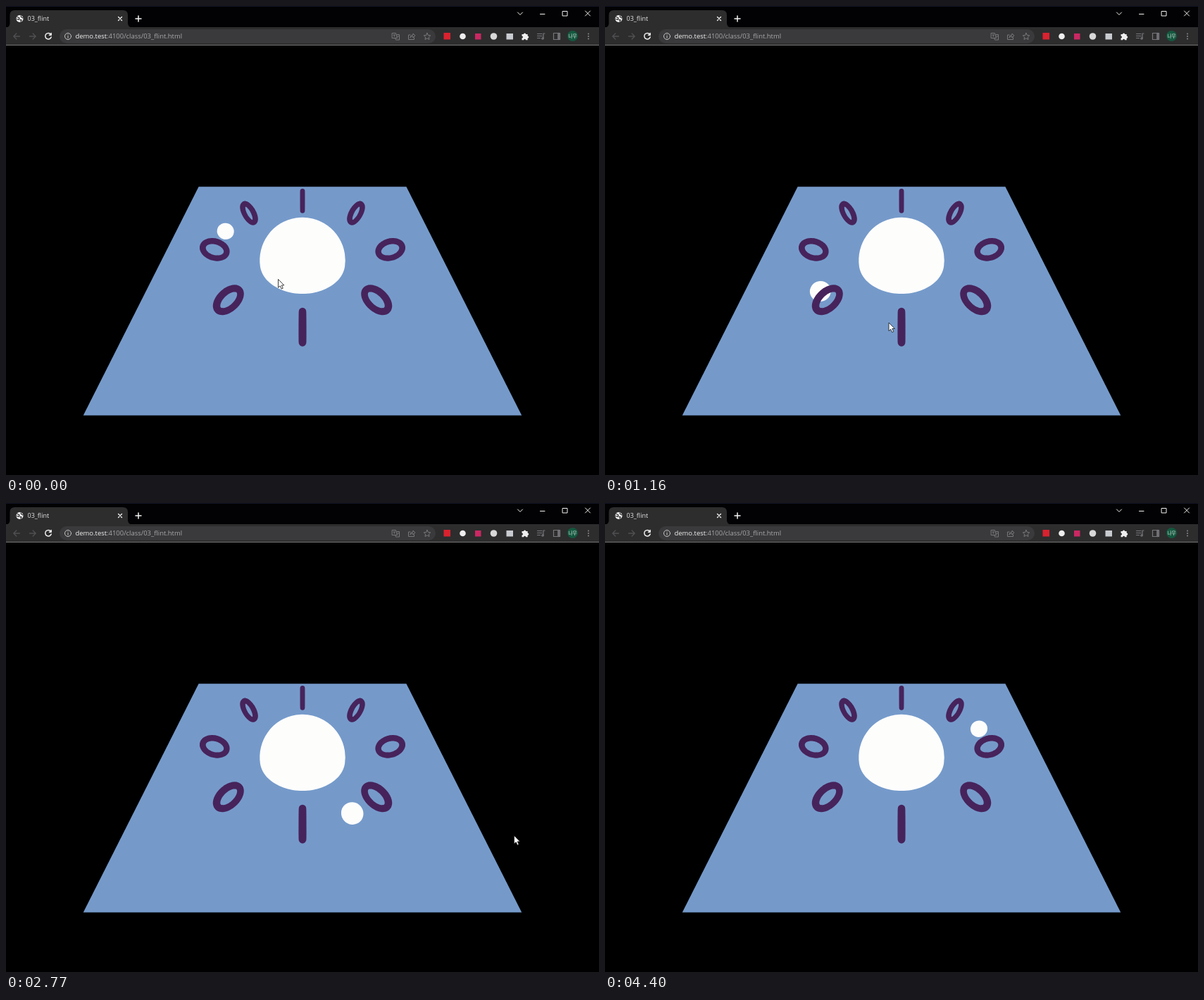
These frames come from a looping animation (842x665 px, 4.43 s). An HTML page with a canvas:

```html
<!DOCTYPE html>
<html lang="ko">
<head>
<meta charset="utf-8">
<title>03_flint</title>
<style>
  html, body { margin: 0; width: 100%; height: 100%; overflow: hidden; background: #000; }
  #stage { position: relative; width: 842px; height: 665px; overflow: hidden; background: #000; }
  canvas, svg { position: absolute; left: 0; top: 0; display: block; }
  text { font-family: "Open Sans", "Noto Sans", sans-serif; }
  .line { fill: none; stroke-linecap: round; stroke-linejoin: round; }
</style>
</head>
<body>
<div id="stage">
  <canvas id="scene" width="842" height="665"></canvas>
  <svg width="842" height="665" viewBox="0 0 842 665">
    <!-- tab strip -->
    <rect width="842" height="30" fill="#020204"/>
    <rect width="842" height="1" fill="#111426"/>
    <path d="M0 30.5Q5 30 5.500 25V13Q5.500 6 12.500 6H166Q173 6 173 13V25Q173.500 30 179 30.500Z" fill="#2d2d2e"/>
    <g class="line" stroke="#2d2d2e" stroke-width="1.300">
      <circle cx="19.500" cy="18" r="5" fill="#f1f1f1" stroke="none"/>
      <path d="M16 15.500l3 1.500l-1 2.500l-2.500-1M21 14l1 2l2 1M20 19.500l2 .5l-1 2"/>
    </g>
    <text x="30.500" y="21.200" font-size="9" fill="#e4e4e4">03_flint</text>
    <g class="line" stroke="#f4f4f4" stroke-width="1.300">
      <path d="M159.500 15.500l5 5m0-5l-5 5"/>
      <path d="M184 18h8m-4-4v8" stroke-width="1.500"/>
      <path d="M726.500 9l3.500 3.500l3.500-3.500" stroke-width="1"/>
      <path d="M758.500 11.500h6.500M822.500 7l7 7m0-7l-7 7" stroke-width="1"/>
      <rect x="790.500" y="7.500" width="6.500" height="6.500" stroke-width="1"/>
    </g>

    <!-- toolbar -->
    <rect y="30" width="842" height="25" fill="#2d2d2e"/>
    <rect y="55" width="842" height="1" fill="#777"/>
    <rect x="76" y="33" width="534" height="20" rx="10" fill="#3a3a3c"/>
    <g class="line" stroke="#505052" stroke-width="1.300">
      <path d="M19.500 43h-8.500m3.800-4l-4 4l4 4"/>
      <path d="M33.500 43h8.500m-3.800-4l4 4l-4 4"/>
    </g>
    <path class="line" d="M63.600 40.200a4.300 4.300 0 1 0 .6 3.800M64.200 38.500v2.700h-2.700" stroke="#eee" stroke-width="1.500"/>
    <g class="line" stroke="#c4c4c4" stroke-width="1">
      <circle cx="88" cy="43" r="4.500"/>
      <path d="M88 42.500v2.800M88 40.600v.2"/>
    </g>
    <text x="98.500" y="46.300" font-size="9.450" fill="#a8a8aa"><tspan fill="#f2f2f2">demo.test</tspan>:4100/class/03_flint.html</text>
    <g class="line" stroke="#77777a" stroke-width="1">
      <path d="M548.500 38.500h5l2 7h-7zM555 40.500h3.500v7.500h-5l-1-2.500M550 41h2.500m-1.200 0v2.500M555.500 43h2"/>
      <path d="M574 41h-2.500v6.500h8V45M574 44.500q.5-3.500 4-3.500v-2l3 3l-3 3v-2q-2.500 0-4 1.500z"/>
      <path d="M598 38.300l1.400 3.100l3.400.4l-2.500 2.300l.7 3.400l-3-1.700l-3 1.700l.7-3.400l-2.500-2.300l3.400-.4z"/>
    </g>

    <!-- extensions -->
    <rect x="621.500" y="38" width="9.500" height="9.500" fill="#d9222f"/>
    <circle cx="648.500" cy="43" r="4.300" fill="#eee"/>
    <rect x="666" y="39" width="8.500" height="8.500" fill="#c92862"/>
    <circle cx="692.500" cy="43" r="4.800" fill="#d8d8d8"/>
    <rect x="710.500" y="39" width="9.500" height="8.500" fill="#c8cbd0"/>
    <path d="M732.500 40h2.500a1.600 1.600 0 0 1 3.200 0h2.500v2.500a1.600 1.600 0 0 1 0 3.200v2.500h-2.600a1.500 1.500 0 0 0-3 0h-2.600v-2.600a1.500 1.500 0 0 0 0-3z" fill="#f0f0f0"/>
    <g class="line" stroke="#77777c" stroke-width="1.200">
      <path d="M754.500 39.500h6.500M754.500 42.500h6.500M754.500 45.500h4M763 46v-7h2"/>
      <circle cx="762" cy="46" r="1.200"/>
      <rect x="777.500" y="38.500" width="9" height="9"/>
      <path d="M784.500 39v8" stroke-width="2.500"/>
    </g>
    <circle cx="804.500" cy="42.500" r="7.500" fill="#14583f"/>
    <text x="804.500" y="45" font-size="6.500" fill="#eee" text-anchor="middle" style="font-family:'Noto Sans CJK KR','Noto Sans CJK',sans-serif">나무</text>
    <g fill="#88888b">
      <circle cx="827" cy="39.500" r="1"/><circle cx="827" cy="43" r="1"/><circle cx="827" cy="46.500" r="1"/>
    </g>

    <path id="cursor" d="M0 0V11.800L2.700 9.300L4.600 13.600L6.700 12.700L4.800 8.500H8.300Z" fill="#fff" stroke="#111" stroke-width=".8"/>
  </svg>
</div>
<script>
const LOOP = 4430;
const CX = 421, CY = 360.5;
const FOCAL = 304 / Math.tan(37.5 * Math.PI / 180);
const H = Math.SQRT1_2, DIST = 7 * Math.SQRT2;
const RAD = Math.PI / 180;

// time, degrees around the dome
const ORBIT = [[0, -109.6], [760, -73.2], [1560, -33.3], [2070, -8.1], [2770, 27], [3230, 50.8], [4430, 110.3]];
// time, x, y of the pointer tip
const POINTER = [[0, 386.5, 387.5], [150, 388, 388], [620, 780, 425], [760, 787, 427], [840, 784, 428],
  [1050, 403, 449], [1630, 403, 449], [2000, 698, 472], [2070, 704.5, 473], [2400, 714, 473],
  [2670, 721, 472], [2780, 721.5, 471.5], [2950, 773, 462]];
const POINTER_END = 2980;

const ctx = document.getElementById('scene').getContext('2d');
const cursor = document.getElementById('cursor');

function sample(keys, t, col) {
  let i = 1;
  while (i < keys.length - 1 && keys[i][0] < t) i++;
  const a = keys[i - 1], b = keys[i];
  const k = Math.min(1, (t - a[0]) / (b[0] - a[0]));
  return a[col] + (b[col] - a[col]) * k;
}

// near: towards the viewer along the ground, side: screen right
const toView = (near, height, side) => [side, (height - near) * H, DIST - (near + height) * H];

function toScreen(near, height, side) {
  const [x, y, z] = toView(near, height, side);
  return [CX + x * FOCAL / z, CY - y * FOCAL / z];
}

// A sphere in perspective is an ellipse stretched away from the centre.
function makeSphere(near, height, side, r) {
  const [x, y, z] = toView(near, height, side);
  const off = Math.hypot(x, y), dist = Math.hypot(off, z);
  const a = Math.atan2(off, z), s = Math.asin(r / dist);
  const inner = FOCAL * Math.tan(a - s), outer = FOCAL * Math.tan(a + s);
  const turn = Math.atan2(-y, x), mid = (inner + outer) / 2;
  return {
    x: CX + mid * Math.cos(turn), y: CY + mid * Math.sin(turn),
    rx: (outer - inner) / 2, ry: FOCAL * r / Math.sqrt(z * z - r * r),
    turn, depth: dist * dist - r * r
  };
}

function addSphere(path, s) {
  path.moveTo(s.x + s.rx * Math.cos(s.turn), s.y + s.rx * Math.sin(s.turn));
  path.ellipse(s.x, s.y, s.rx, s.ry, s.turn, 0, Math.PI * 2);
}

function polygon(points) {
  const path = new Path2D();
  points.forEach(p => path.lineTo(...toScreen(...p)));
  path.closePath();
  return path;
}

const onCircle = (r, height, deg) => [r * Math.cos(deg * RAD), height, r * Math.sin(deg * RAD)];

const ground = polygon([[-5, 0, -5], [-5, 0, 5], [5, 0, 5], [5, 0, -5]]);

// The dome is its round base plus the upper part of the sphere's outline.
const dome = polygon(Array.from({ length: 120 }, (_, i) => onCircle(1.5, 0, -i * 3)));
const dip = Math.asin(1.5 / Math.sqrt(DIST * DIST - 2.25));
const top0 = Math.PI - dip, domeR = FOCAL * Math.tan(Math.asin(1.5 / DIST));
dome.moveTo(CX + domeR * Math.cos(top0), CY + domeR * Math.sin(top0));
dome.arc(CX, CY, domeR, top0, Math.PI * 2 + dip);
dome.closePath();

// Each ring is a chain of small spheres.
const beads = [];
for (let ring = 0; ring < 8; ring++) {
  for (let i = 0; i < 80; i++) {
    const b = i / 80 * Math.PI * 2;
    beads.push(makeSphere(...onCircle(3 + 0.4 * Math.cos(b), 0.5 + 0.4 * Math.sin(b), ring * 45), 0.1));
  }
}

function fill(path, color) {
  ctx.fillStyle = color;
  ctx.fill(path);
}

function draw(t) {
  const ball = makeSphere(...onCircle(3, 0.5, sample(ORBIT, t, 1)), 0.3);
  const back = new Path2D(), front = new Path2D(), moon = new Path2D();
  beads.forEach(b => addSphere(b.depth > ball.depth ? back : front, b));
  addSphere(moon, ball);

  ctx.clearRect(0, 0, 842, 665);
  fill(ground, '#759aca');
  fill(dome, '#fdfdfc');
  fill(back, '#47235b');
  fill(moon, '#fdfdfc');
  fill(front, '#47235b');

  cursor.setAttribute('visibility', t < POINTER_END ? 'visible' : 'hidden');
  cursor.setAttribute('transform', `translate(${sample(POINTER, t, 1)} ${sample(POINTER, t, 2)})`);
}

const start = performance.now();
function tick() {
  draw((performance.now() - start) % LOOP);
  requestAnimationFrame(tick);
}
tick();
</script>
</body>
</html>
```
